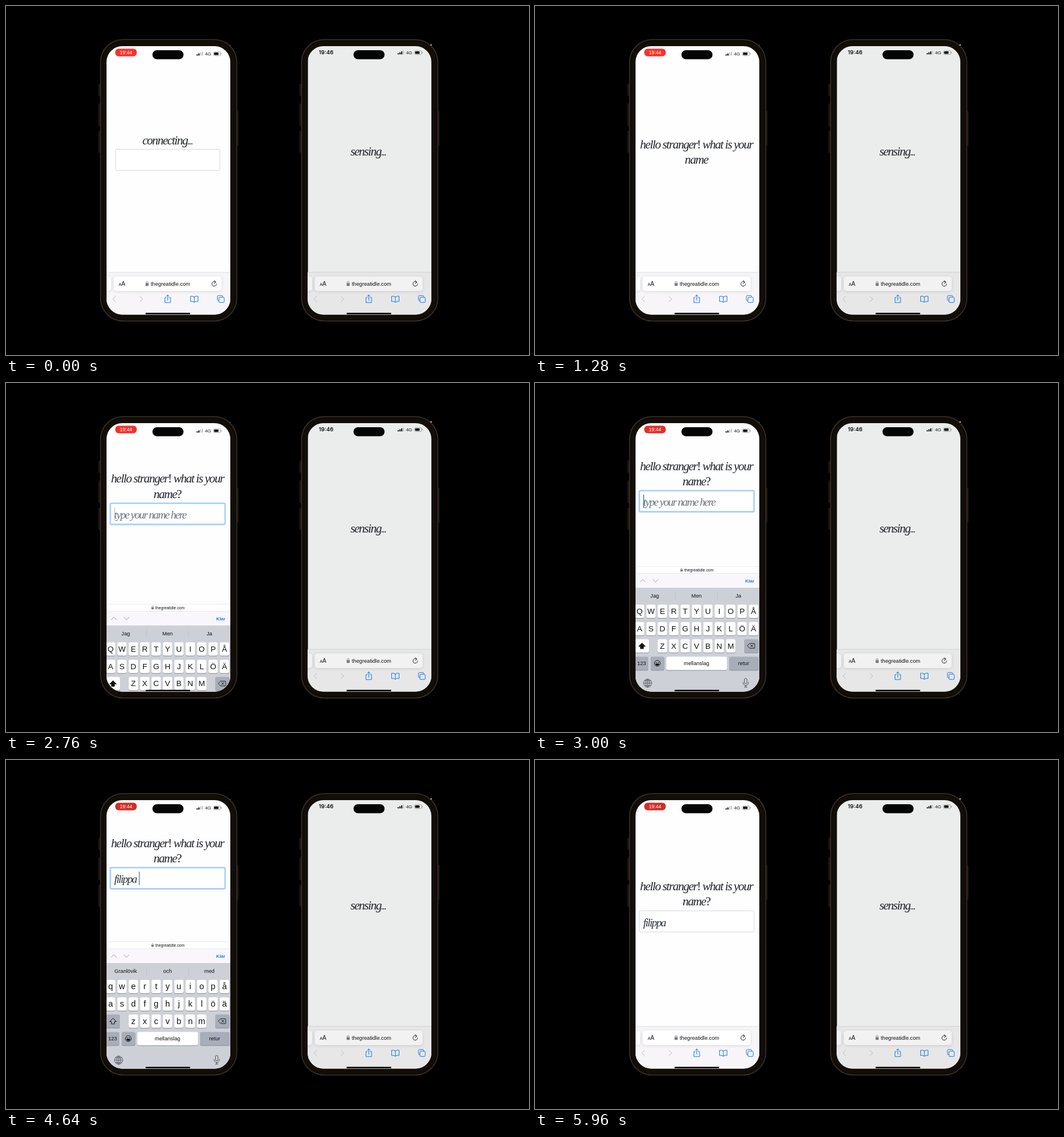
Recreate the animation shown at these times as an HTML page. Size 900 px wide and 600 px high, loop 6000 ms.

```html
<!DOCTYPE html>
<html lang="en">
<head>
<meta charset="utf-8">
<title>Two phones</title>
<style>
  html, body { margin: 0; width: 100%; height: 100%; overflow: hidden; background: #000; }
  svg { display: block; width: 900px; height: 600px; }
  text { font: 9.2px "Liberation Sans", Arial, sans-serif; fill: #111; white-space: pre; }
  .mid { text-anchor: middle; }
  .clock { font: 600 9.4px Inter, sans-serif; }
  .script { font: italic 21px "Liberation Serif", "Times New Roman", serif; letter-spacing: -1.45px; fill: #20242a; }
  .field { font-size: 19px; letter-spacing: -1.65px; }
  .key { font-size: 14.5px; }
  .line { fill: none; stroke-linecap: round; stroke-linejoin: round; }
</style>
</head>
<body>
<svg viewBox="0 0 900 600">
  <defs>
    <clipPath id="screen"><rect x="173" y="69" width="213" height="461.5" rx="27"/></clipPath>
    <filter id="soft" x="-10%" y="-30%" width="120%" height="170%">
      <feDropShadow dx="0" dy="1" stdDeviation="2.5" flood-opacity=".13"/>
    </filter>
  </defs>
  <g id="stage"></g>
</svg>
<script>
const LOOP = 6000;
const GREETING = ['hello stranger! what is your', 'name?'];
const GREETING_TEXT = GREETING.join(' ');
const NAME = 'filippa';
const SITE = 'thegreatidle.com';
const BLUE = '#1479e6';
const KEY_PITCH = 19.6;

const rect = (x, y, w, h, fill, rx = 0, extra = '') =>
  `<rect x="${x}" y="${y}" width="${w}" height="${h}" rx="${rx}" fill="${fill}" ${extra}/>`;
const line = (d, stroke, width = 1, extra = '') =>
  `<path class="line" d="${d}" stroke="${stroke}" stroke-width="${width}" ${extra}/>`;
const label = (x, y, text, cls = '', style = '', id = '') =>
  `<text x="${x}" y="${y}" class="${cls}" style="${style}" ${id && `id="${id}"`}>${text}</text>`;

// The script face has upright marks and tiny dots.
const script = text => text
  .replace(/[!?]/g, c => `<tspan font-style="normal">${c}</tspan>`)
  .replace(/\.{3}/, '<tspan font-size="17">...</tspan>');

const lock = (x, y, s = 1) => `<g transform="translate(${x} ${y}) scale(${s})">` +
  rect(-2.6, -1, 5.2, 4.6, '#77787c', .8) + line('M-1.6-1v-1.2a1.6 1.6 0 0 1 3.2 0v1.2', '#77787c', .9) + '</g>';

function body() {
  const button = (x, y, h) => rect(x, y, 3, h, '#1b1411', 1, 'stroke="#30241f" stroke-width=".6"');
  return button(159.3, 134, 20) + button(159.3, 168, 38) + button(159.3, 215, 37) + button(396.6, 181, 59) +
    rect(162.6, 57.6, 234.6, 484, '#17110c', 39, 'stroke="#41342f" stroke-width="1.3"') +
    rect(165, 60, 229.8, 479.2, '#120e07', 36.5, 'stroke="#0a0704" stroke-width="1"');
}

function status(y, bars) {
  let out = '';
  for (let i = 0; i < 4; i++) {
    const h = 2.4 + i * 1.4;
    out += rect(328 + i * 3, y + 3.3 - h, 2, h, i < bars ? '#111' : '#c3c3c5', .5);
  }
  return out + label(342.2, y + 2.9, '4G', '', 'font-size:8px') +
    rect(357, y - 3.1, 12.4, 6.4, 'none', 1.8, 'stroke="#8e8e90" stroke-width=".8"') +
    rect(358.1, y - 2, 7.6, 4.2, '#111', 1) + rect(370.2, y - 1, 1, 2.4, '#9a9a9c', .5) +
    rect(252, 76, 53.5, 15.6, '#050505', 7.8) + '<circle cx="297" cy="83.8" r="2.4" fill="#0c0d12"/>';
}

function toolbar(bar, tab, rule) {
  return rect(173, 458, 213, 73, bar) + rect(173, 457.5, 213, 1, rule) +
    rect(150, 465, 31, 25, tab, 5, 'filter="url(#soft)"') +
    rect(185.5, 465, 185.5, 25, tab, 5, 'filter="url(#soft)"') +
    label(194, 481, 'A', '', 'font-size:7px') + label(198.6, 481, 'A', '', 'font-size:10px') +
    lock(242.8, 477.6) + label(249, 481, SITE) +
    line('M361 474.8a4 4 0 1 0 1.3 3M358.2 472.3l3 2.4-2.8 2.2', '#222') +
    line('M188.5 499.2l-4.8 4.6 4.8 4.6M230.5 499.2l4.8 4.6-4.8 4.6', '#b9babd') +
    line('M275.8 501.3h-2.3v8.6h9.6v-8.6h-2.3M278.3 506v-9M275.8 499.2l2.5-2.5 2.5 2.5', BLUE) +
    line('M324 500.2q-2.8-2-6.4-1.2v9q3.6-.8 6.4 1.2q2.8-2 6.4-1.2v-9q-3.6-.8-6.4 1.2zv9', BLUE) +
    rect(366.4, 500.7, 9, 9, 'none', 1.6, `stroke="${BLUE}"`) +
    line('M366 506.6h-.6a1.6 1.6 0 0 1-1.6-1.6v-5.6a1.6 1.6 0 0 1 1.6-1.6h5.8a1.6 1.6 0 0 1 1.6 1.6v.8', BLUE);
}

const homeBar = rect(240, 527.4, 77, 2.6, '#000', 1.3);

function keyCap(x, y, w, fill) {
  return rect(x, y + 1, w, 23, '#8b8f97', 3) + rect(x, y, w, 23, fill, 3);
}

function keyboard() {
  const dark = '#a8aeb9';
  let out = rect(173, 312, 213, 40, '#fff') + rect(173, 312, 213, .8, '#e6e6e8') +
    lock(252.2, 318.4, .75) + label(257, 321, SITE, '', 'font-size:6.8px') +
    rect(173, 324.5, 213, 25, '#f9f7fb') + rect(173, 324.3, 213, .7, '#e2e1e5') +
    line('M181 339.3l4.5-4.6 4.5 4.6M203 334.7l4.5 4.6 4.5-4.6', '#9d9ea3') +
    label(369.5, 340.2, 'Klar', 'mid', `font-size:8px;font-weight:700;fill:${BLUE}`) +
    rect(173, 349, 213, 182, '#cdd1d7') +
    rect(241.5, 356, .8, 14, '#bbbfc6') + rect(313.5, 356, .8, 14, '#bbbfc6');
  [206, 278, 350].forEach(x => out += label(x, 366.2, '', 'mid hint'));
  [['qwertyuiopå', 0, 378], ['asdfghjklöä', 0, 408], ['zxcvbnm', 2, 437.5]].forEach(([row, col, y]) =>
    [...row].forEach((c, i) => {
      const x = 180 + (col + i) * KEY_PITCH;
      out += keyCap(x - 8.1, y, 16.2, '#fff') + label(x, y + 16, c, 'mid key');
    }));
  out += keyCap(170, 437.5, 26, dark).replace(/(.*)<rect/, '$1<rect id="shiftCap"') +
    line('M184 444.2l-5.6 5.6h3v4h5.2v-4h3z', '#111', 1, 'id="shiftArrow"') +
    keyCap(360, 437.5, 24.5, dark) +
    line('M369.6 444.8h7.4a1 1 0 0 1 1 1v6.4a1 1 0 0 1-1 1h-7.4l-4-4.2zM371 447l4 4M375 447l-4 4', '#111', .9) +
    keyCap(170, 467.5, 25, dark) + label(183.5, 482.3, '123', 'mid', 'font-size:9px') +
    keyCap(199, 467.5, 23.5, dark) +
    '<circle cx="210.5" cy="479" r="5" fill="none" stroke="#111"/><circle cx="208.8" cy="477.6" r=".8"/><circle cx="212.2" cy="477.6" r=".8"/>' +
    '<path d="M207.3 479.6h6.4a3.2 3.2 0 0 1-6.4 0z"/>' +
    keyCap(226, 467.5, 104.5, '#fff') + label(278, 482, 'mellanslag', 'mid') +
    keyCap(334, 467.5, 51, dark) + label(359, 482, 'retur', 'mid');
  const globe = '<g fill="none" stroke="#4c5057" stroke-width=".9"><circle cx="193.8" cy="516" r="7"/>' +
    '<ellipse cx="193.8" cy="516" rx="3.2" ry="7"/><path d="M186.8 516h14M193.8 509v14M188.2 512h11.2M188.2 520h11.2"/></g>';
  const mic = rect(360.4, 508, 4.4, 9, 'none', 2.2, 'stroke="#4c5057"') +
    line('M358 514.5v.8a4.6 4.6 0 0 0 9.2 0v-.8M362.6 520v2.6M360.4 522.8h4.4', '#4c5057');
  return `<g id="rows">${out}</g>${globe}${mic}`;
}

const leftPhone = body() + '<g clip-path="url(#screen)">' +
  rect(173, 69, 213, 462, '#fefefe') +
  rect(188, 73.4, 37, 13, '#f0322b', 5.8, 'id="pill"') +
  label(206.5, 83, '19:44', 'mid', 'font-size:8.6px;fill:#fff') + status(82, 2) +
  toolbar('#f7f5f8', '#fff', '#dedde0') +
  label(277.7, 0, '', 'script mid', '', 'first') + label(277.7, 0, '', 'script mid', '', 'second') +
  rect(0, 0, 0, 37, '#fff', 2, 'id="box"') +
  label(186.3, 0, '', 'script field', '', 'entry') + rect(0, 0, 1.5, 23, '#4775a8', .5, 'id="caret"') +
  `<g id="keyboard">${keyboard()}</g>${homeBar}</g>` +
  rect(385, 67, 1.2, 1.2, '#777');

const rightPhone = '<g transform="translate(346)">' + body() + '<g clip-path="url(#screen)">' +
  rect(173.6, 69, 213, 462, '#ebecec') +
  label(192.3, 83.4, '19:46', 'clock') + status(80, 3) +
  label(277.3, 257, script('sensing...'), 'script mid') +
  toolbar('#e7e7e8', '#f2f2f3', '#d2d2d3') + homeBar + '</g>' +
  rect(384.5, 66, 2.2, 1.8, '#ddd') + '</g>';

document.getElementById('stage').innerHTML = leftPhone + rightPhone;

const $ = id => document.getElementById(id);
const keys = [...document.querySelectorAll('.key')];
const hints = [...document.querySelectorAll('.hint')];
const set = (el, attrs) => { for (const k in attrs) el.setAttribute(k, attrs[k]); };
const mix = (a, b, k) => a + (b - a) * k;
const ramp = (t, from, to) => Math.min(1, Math.max(0, (t - from) / (to - from)));
const easeOut = k => 1 - (1 - k) ** 3;

function write(el, text, y) {
  const html = script(text);
  if (el.innerHTML !== html) el.innerHTML = html;
  el.setAttribute('y', y);
}

function entryAt(t) {
  if (t < 3400) return '';
  if (t < 3760) return NAME[0];
  if (t < 4240) return NAME.slice(0, 2);
  if (t < 4640) return NAME.slice(0, 3);
  return NAME + ' ';
}

function hintsAt(entry) {
  if (!entry) return ['Jag', 'Men', 'Ja'];
  if (entry.length > NAME.length) return ['Granlövik', 'och', 'med'];
  const typed = entry[0].toUpperCase() + entry.slice(1);
  return [`“${typed}”`, 'Fint', 'Filippa'];
}

function render(t) {
  const pulse = .5 + .5 * Math.cos(2 * Math.PI * t / 1320);
  $('pill').setAttribute('fill', `rgb(${mix(206, 248, pulse)},${mix(46, 49, pulse)},${mix(40, 43, pulse)})`);

  const connecting = t < 40;
  const asking = t >= 2280;
  const open = easeOut(ramp(t, 2660, 2960)) - easeOut(ramp(t, 5460, 5740));
  const focused = t >= 2640 && t < 5460;
  const shift = -74.3 * open;
  const entry = entryAt(t);

  if (connecting) {
    write($('first'), 'connecting...', 238);
    write($('second'), '', 0);
  } else {
    const count = Math.floor((t - 40) / 37.5);
    const wrapped = count > GREETING[0].length + 1;
    const y = asking ? 224 + shift : wrapped ? 245 : 258;
    write($('first'), GREETING_TEXT.slice(0, Math.min(count, GREETING[0].length)), y);
    write($('second'), wrapped ? GREETING_TEXT.slice(GREETING[0].length + 1, count) : '', y + 26.3);
  }

  set($('box'), {
    x: connecting ? 188.5 : 179.5,
    y: connecting ? 246.3 : 259.3 + shift,
    width: connecting ? 179.5 : 197.5,
    height: 36.4,
    stroke: focused ? '#a8d0f6' : '#d5d8de',
    'stroke-width': focused ? 2.6 : 1,
    visibility: connecting || asking ? 'visible' : 'hidden'
  });

  const field = $('entry');
  write(field, asking ? entry || 'type your name here' : '', 285.5 + shift);
  field.style.fill = entry ? '#2b3440' : '#6c757f';
  set($('caret'), {
    x: 186.2 + (entry ? field.getComputedTextLength() + 1.3 : 0),
    y: 266.4 + shift,
    opacity: focused ? .5 + .5 * Math.cos(2 * Math.PI * (t - 3000) / 773) : 0
  });

  $('keyboard').setAttribute('transform', `translate(0 ${222 * (1 - open)})`);
  $('keyboard').setAttribute('visibility', open > 0 ? 'visible' : 'hidden');
  $('rows').setAttribute('transform', `translate(0 ${t < 3120 ? 3 : 0})`);
  const upper = !entry;
  keys.forEach(key => {
    const c = key.textContent;
    key.textContent = upper ? c.toUpperCase() : c.toLowerCase();
    key.style.fontSize = upper ? '13.5px' : '14.5px';
  });
  hintsAt(entry).forEach((text, i) => hints[i].textContent = text);
  $('shiftCap').setAttribute('fill', upper ? '#fff' : '#a8aeb9');
  $('shiftArrow').style.fill = upper ? '#111' : 'none';
}

const start = performance.now();
function tick() {
  render((performance.now() - start) % LOOP);
  requestAnimationFrame(tick);
}
tick();
</script>
</body>
</html>
```
